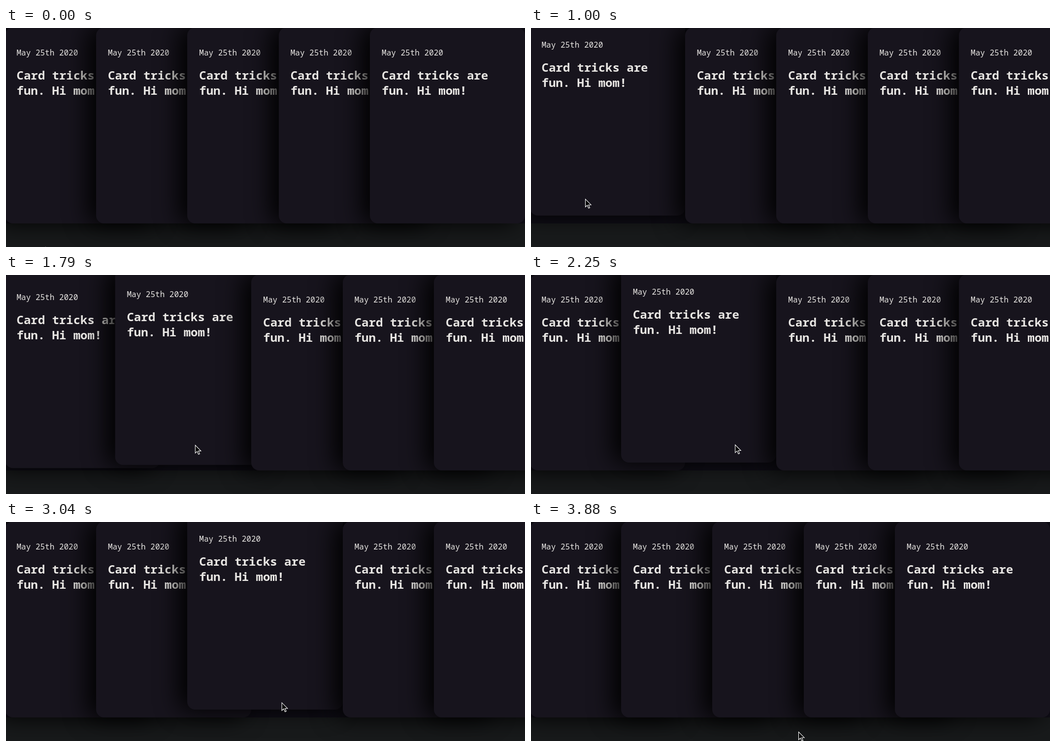
These frames come from a looping animation (1054x446 px, 3920 ms). An HTML page:

```html
<!DOCTYPE html>
<html lang="en">
<head>
<meta charset="utf-8">
<title>Card stack</title>
<style>
html, body { margin: 0; width: 100%; height: 100%; overflow: hidden; }
body {
  position: relative;
  background: linear-gradient(#100e17 398px, #181a1b 398px);
  color: #e8e6e3;
  font-family: "Noto Sans Mono", "DejaVu Sans Mono", monospace;
}
.card {
  position: absolute; top: -1px; width: 315.4px; height: 399px;
  border-radius: 16px; background: #17141d;
  box-shadow: -16px 0 48px #000;
  white-space: nowrap;
}
p, h2 { position: absolute; left: 24px; margin: 0; }
p { top: 41px; font-size: 16px; line-height: 20px; }
h2 { top: 81px; font-size: 24px; line-height: 31px; font-weight: 700; }
svg { position: absolute; left: 0; top: 0; overflow: visible; }
</style>
</head>
<body>
<script>
const LOOP = 3920, COUNT = 5, STEP = 185.4, SHIFT = 130, LIFT = 16, FADE = 200;

// Card i is hovered from turns[i] to turns[i + 1]
const turns = [780, 1708, 2440, 3100];

// Pointer moves: start, end, and the place reached
const entry = { x: 80, y: 446 };
const moves = [
  { start: 690, end: 855, x: 110, y: 348 },
  { start: 1300, end: 1900, x: 410, y: 346 },
  { start: 2210, end: 2640, x: 573, y: 320 },
  { start: 2850, end: 3263, x: 543, y: 427 }
];

const cards = Array.from({ length: COUNT }, (_, i) => {
  const card = document.createElement("div");
  card.className = "card";
  card.style.left = -2.5 + STEP * i + "px";
  card.innerHTML = "<p>May 25th 2020</p><h2>Card tricks are<br>fun. Hi mom!</h2>";
  document.body.append(card);
  return card;
});

document.body.insertAdjacentHTML("beforeend",
  `<svg width="14" height="20"><path d="M.5 .5V16.5L4.2 13L7 19L9.4 18L6.8 12.2H12Z"
    fill="#000" stroke="#fff" stroke-width="1.1"/></svg>`);
const pointer = document.querySelector("svg");

const clamp = v => Math.min(1, Math.max(0, v));
const smooth = v => v * v * (3 - 2 * v);
const bezier = (a, b, u) => 3 * a * u * (1 - u) ** 2 + 3 * b * u * u * (1 - u) + u ** 3;

// The CSS "ease" curve, solved by bisection
function ease(x) {
  if (x === 0 || x === 1) return x;
  let lo = 0, hi = 1;
  for (let n = 0; n < 24; n++) {
    const mid = (lo + hi) / 2;
    if (bezier(.25, .25, mid) < x) lo = mid; else hi = mid;
  }
  return bezier(.1, 1, lo);
}

const place = (el, x, y) => el.style.transform = `translate(${x}px, ${y}px)`;

function draw(t) {
  const level = i => i < turns.length ? ease(clamp((t - turns[i]) / FADE)) : 0;
  const last = turns.length - 1;
  let pushed = 0;
  cards.forEach((card, i) => {
    const hover = i < last ? level(i) - level(i + 1) : 0;
    place(card, SHIFT * pushed, -LIFT * hover);
    pushed += hover;
  });

  let { x, y } = entry;
  for (const m of moves) {
    const k = smooth(clamp((t - m.start) / (m.end - m.start)));
    x += (m.x - x) * k;
    y += (m.y - y) * k;
  }
  place(pointer, x, y);
}

const begin = performance.now();
function tick() {
  draw((performance.now() - begin) % LOOP);
  requestAnimationFrame(tick);
}
tick();
</script>
</body>
</html>
```
